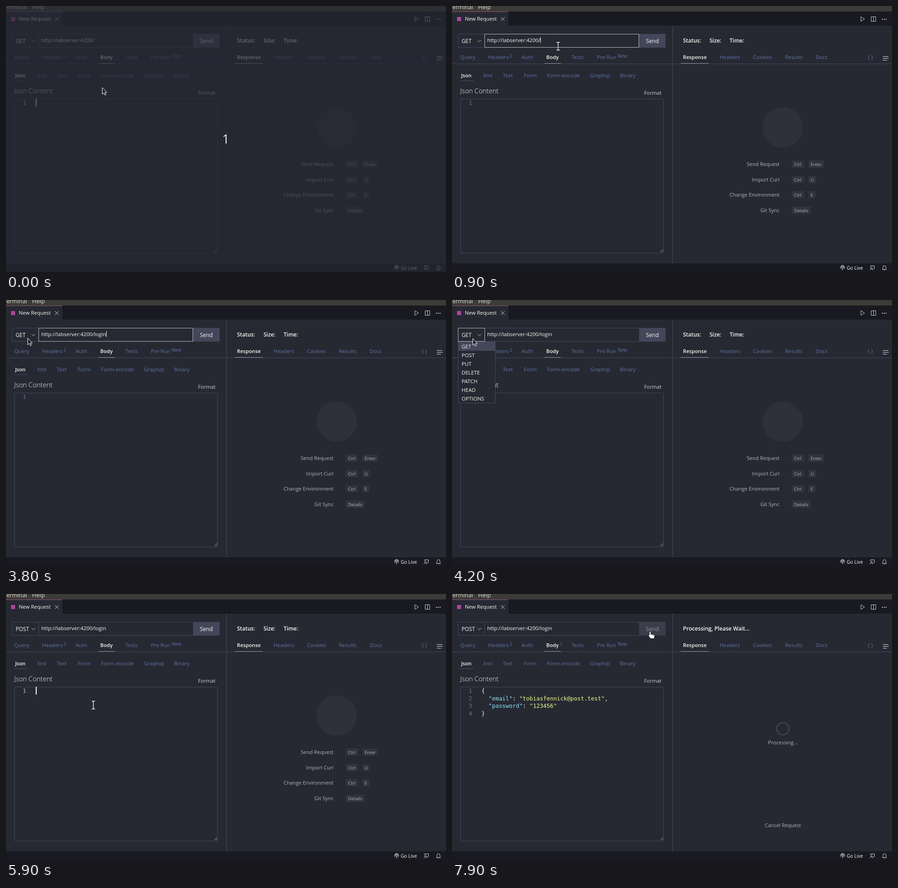
Write an HTML page that moves like this. It is 962 px wide and 582 px high and loops after 8 s.

```html
<!DOCTYPE html>
<html lang="en">
<head>
<meta charset="utf-8">
<title>Request panel</title>
<style>
  html, body { margin: 0; width: 100%; height: 100%; overflow: hidden; background: #262932; }
  svg { display: block; width: 962px; height: 582px; font-family: "Open Sans", "Noto Sans", sans-serif; }
  text { white-space: pre; }
  .code { font-family: "DejaVu Sans Mono", monospace; font-size: 12.4px; }
</style>
</head>
<body>
<svg id="stage" viewBox="0 0 962 582"></svg>
<script>
const BG = '#262932', DARK = '#191a21', LINE = '#44475a', BLUE = '#6272a4',
      WHITE = '#f8f8f2', GREY = '#b2b4b8', CYAN = '#8be9fd', YELLOW = '#f1fa8c';
const LOOP = 8000;
const HOST = 'http://labserver:4200/', PATH = 'login';

const text = (x, y, s, size = 11.5, fill = BLUE, attrs = '') =>
  `<text x="${x}" y="${y}" font-size="${size}" fill="${fill}" ${attrs}>${s}</text>`;
const bold = (x, y, s, size = 11.2) => text(x, y, s, size, WHITE, 'font-weight="600"');
const box = (x, y, w, h, fill, attrs = '') =>
  `<rect x="${x}" y="${y}" width="${w}" height="${h}" fill="${fill}" ${attrs}/>`;
const frame = (x, y, w, h, color, attrs = '') =>
  box(x + .5, y + .5, w, h, 'none', `stroke="${color}" ${attrs}`);
const line = (d, color, attrs = '') => `<path d="${d}" fill="none" stroke="${color}" ${attrs}/>`;
const group = (id, ...parts) => `<g id="${id}">${parts.join('')}</g>`;
const row = (y, items) => items.map(([x, s]) => text(x, y, s)).join('');
const code = (x, y, s, fill = WHITE, attrs = '') =>
  `<text class="code" x="${x}" y="${y}" fill="${fill}" ${attrs}>${s}</text>`;
const lineY = n => Math.round(199 + 16.8 * n);
const lineNo = n => code(44, lineY(n), n, BLUE, `id="no${n}" text-anchor="end"`);

function topBars() {
  return box(0, 0, 962, 12, '#3c3b37') +
    text(46, 7, 'Terminal', 12.6, '#dfdbd2', 'text-anchor="end"') + text(57, 7, 'Help', 12.9, '#dfdbd2') +
    box(0, 12, 962, 31, DARK) + box(0, 12, 123, 31, BG) + box(0, 12, 123, 1, '#94527e') +
    box(11, 24, 9, 9, '#a8479b') + text(28, 32, 'New Request', 11.4, WHITE) +
    line('M107 24.5l8 8m0-8l-8 8', '#d8d8d6') +
    line('M894 23.5v10l8-5z', '#d0d0d0') +
    line('M916.5 23.5h10v10h-10zM921.5 23.5v10', '#d0d0d0') +
    [940, 944, 948].map(x => box(x, 28, 2, 2, '#d0d0d0')).join('');
}

function statusBar() {
  return box(0, 563, 962, 19, DARK) + text(863, 577, 'Go Live', 10.4, WHITE) +
    line('M851 575a4.2 4.2 0 1 1 6 0M852.6 573a2 2 0 1 1 2.8 0M854 572v6', '#d8d8d6', 'stroke-width="1.2"') +
    line('M915 571v-2.5h8.500v6h-2l-2 2M914 578c0-4 6-4 6 0M917 571.500a1.600 1.600 0 1 0 .1 0', '#d8d8d6') +
    line('M941 576.500h9l-1.200-2v-3a3.300 3.300 0 0 0-6.600 0v3zM944.500 578h2', '#d8d8d6');
}

function requestPane() {
  return frame(13, 61, 58, 29, LINE) + frame(71, 61, 338, 29, LINE) +
    group('urlFocus', frame(71, 61, 337, 29, '#b9bac0')) +
    group('methodFocus', frame(13, 61, 58, 29, '#b9bac0')) +
    text(21, 81, 'GET', 11.8, WHITE, 'id="method"') + line('M56 74.500l4 4 4-4', '#d0d0d0') +
    text(77, 79, HOST, 11.4, WHITE, 'id="url"') + box(0, 68, 1, 13, '#fff', 'id="urlCaret"') +
    box(409, 61, 58, 30, LINE, 'id="send"') + text(424, 81, 'Send', 12, WHITE, 'id="sendText"') +
    row(116, [[18, 'Query'], [79, 'Headers'], [152, 'Auth'], [261, 'Tests'], [317, 'Pre Run']]) +
    text(126, 113, '2', 9.5) + text(362, 113, 'New', 10) + bold(206, 116, 'Body') +
    group('bodyCount', text(236, 113, '1', 9.5)) +
    box(0, 126, 482, 1, LINE) + box(202, 125, 36, 1, '#8b8d96') +
    bold(20, 156, 'Json') + box(18, 163, 29, 1, '#4e515f') +
    row(156, [[68, 'Xml'], [111, 'Text'], [157, 'Form'], [208, 'Form-encode'], [302, 'Graphql'], [367, 'Binary']]) +
    text(18, 191, 'Json Content', 14.6, WHITE, 'font-weight="300"') + text(420, 194, 'Format', 11.3, '#d0d1d3') +
    frame(18, 203, 444, 337, LINE, 'rx="2"') + line('M455.500 538.500l6-6M459 538.500l2.500-2.500', '#a0a1a6');
}

function editor() {
  const pair = (n, key, value, end) => code(80, lineY(n),
    `<tspan fill="${CYAN}">"${key}"</tspan>: <tspan fill="${YELLOW}">"${value}"</tspan>${end}`);
  return lineNo(1) +
    group('json', lineNo(2), lineNo(3), lineNo(4), code(64.5, lineY(1), '{'),
      pair(2, 'email', 'tobiasfennick@post.test', ','), pair(3, 'password', '123456', ''), code(64.5, lineY(4), '}')) +
    group('brackets', frame(64, 203, 7, 16, '#b4b5b8'), frame(64, 253, 7, 16, '#b4b5b8')) +
    box(65, 203, 2, 17, '#fff', 'id="editCaret"');
}

function responsePane() {
  const key = (x, y, w, s) => box(x, y - 12, w, 16, '#31343f', 'rx="2"') + text(x + 5, y, s, 9.7, GREY);
  const hint = (y, label, ...keys) => text(716, y, label, 11.2, GREY, 'text-anchor="end"') +
    keys.map(([x, w, s]) => key(x, y, w, s)).join('');
  const ctrl = [743, 27, 'Ctrl'];
  const middle = 'text-anchor="middle"';
  return box(482, 43, 1, 520, LINE) +
    bold(505, 116, 'Response') + box(483, 126, 479, 1, LINE) + box(500, 125, 61, 1, '#8b8d96') +
    row(116, [[585, 'Headers'], [658, 'Cookies'], [728, 'Results'], [795, 'Docs'], [909, '{ }']]) +
    line('M942 110.500h12M942 114.500h13M942 118.500h9', '#e0e0de') +
    group('idle', bold(505, 80, 'Status:', 12), bold(563, 80, 'Size:', 12), bold(607, 80, 'Time:', 12),
      '<circle cx="723" cy="266" r="44" fill="#2e313a"/>',
      hint(350, 'Send Request', ctrl, [779, 34, 'Enter']), hint(384, 'Import Curl', ctrl, [779, 17, 'U']),
      hint(417, 'Change Environment', ctrl, [779, 16, 'E']), hint(451, 'Git Sync', [743, 41, 'Details'])) +
    group('busy', bold(505, 80, 'Processing, Please Wait...', 12.1),
      '<circle cx="723.5" cy="295" r="13.3" fill="none" stroke="#3d404c" stroke-width="3"/>',
      text(723.5, 329, 'Processing...', 11.2, GREY, middle), text(723.5, 510, 'Cancel Request', 11.05, GREY, middle));
}

function popup() {
  const methods = ['GET', 'POST', 'PUT', 'DELETE', 'PATCH', 'HEAD', 'OPTIONS'];
  return group('popup', box(13.5, 91.5, 81, 134, BG, `stroke="${LINE}"`),
    box(14, 92, 80, 19, LINE, 'id="pick"'),
    methods.map((m, i) => text(21, 106 + 19 * i, m, 11.5, WHITE)).join(''));
}

function cursors() {
  return group('arrow', '<path d="M.5.5V15l3.400-3.200 2.400 5.200 2.300-1-2.400-5h4.300z" fill="#1d1e22" stroke="#fff"/>') +
    group('ibeam', line('M-3.500-8.500h2.500l1 1 1-1h2.500M0-7.500v15M-3.500 8.500h2.500l1-1 1 1h2.500', '#fff', 'stroke-width="1.300"')) +
    group('hand', `<path d="M-1.500 1q1.500-2 3 0v5l7 1.500q1.500.5 1.500 2l-1 6h-8l-4.500-6.500q0-2 2-1z"
      fill="#fff" stroke="#1d1e22" stroke-width=".8"/>`);
}

const svg = document.getElementById('stage');
svg.innerHTML = box(0, 0, 962, 582, BG) + topBars() + requestPane() + editor() + responsePane() + statusBar() +
  group('veil', box(0, 0, 962, 582, BG, 'opacity=".7"'), text(480.5, 301, '1', 27, '#ececec', 'text-anchor="middle"')) +
  popup() + cursors();

const el = {};
svg.querySelectorAll('[id]').forEach(n => el[n.id] = n);
const show = (id, on) => el[id].style.display = on ? '' : 'none';
const paint = (id, color) => el[id].setAttribute('fill', color);

// Pointer moves: first step, last step, end point, shape
const moves = [
  [0, 0, 210, 178, 'arrow'], [100, 100, 211, 178, 'hand'], [200, 400, 224, 136, 'arrow'],
  [600, 600, 228, 110, 'arrow'], [700, 700, 232, 88, 'ibeam'], [1300, 1400, 202, 54, 'arrow'],
  [3200, 3300, 199, 49, 'arrow'], [3500, 3700, 37, 104, 'arrow'], [3800, 3800, 47, 83, 'arrow'],
  [4000, 4000, 46, 75, 'arrow'], [4200, 4500, 43, 109, 'arrow'], [4800, 4900, 43, 183, 'arrow'],
  [5100, 5200, 58, 225, 'arrow'], [5300, 5300, 70, 243, 'ibeam'], [5500, 5600, 191, 243, 'ibeam'],
  [6300, 6300, 191, 264, 'ibeam'], [6600, 6700, 225, 322, 'ibeam'], [6800, 7100, 362, 153, 'arrow'],
  [7400, 7500, 405, 108, 'arrow'], [7600, 7700, 433, 82, 'hand']
];
const typedAt = [1900, 2100, 2200, 2400, 2500];

function pointer(t) {
  const i = moves.findLastIndex(m => m[0] <= t);
  const [start, end, x, y, shape] = moves[i];
  const [, , fromX, fromY] = moves[Math.max(0, i - 1)];
  const p = Math.min(1, (t - start + 100) / (end - start + 100));
  return { x: fromX + (x - fromX) * p, y: fromY + (y - fromY) * p, shape };
}

function render(ms) {
  const t = Math.floor(ms % LOOP / 100) * 100;
  const during = (a, b) => t >= a && t < b;

  show('veil', t < 100);
  show('urlFocus', during(900, 4200));
  show('methodFocus', during(4200, 4900));
  el.method.textContent = t < 4800 ? 'GET' : 'POST';
  el.url.textContent = HOST + PATH.slice(0, typedAt.filter(k => k <= t).length);
  el.urlCaret.setAttribute('x', Math.round(77 + el.url.getComputedTextLength()));
  show('urlCaret', during(900, 3300) || during(3800, 4200));
  show('popup', during(4000, 4700));
  el.pick.setAttribute('y', t < 4400 ? 92 : 111);

  const pasted = t >= 6100;
  show('json', pasted);
  show('brackets', during(6100, 7700));
  show('editCaret', t < 200 || during(700, 900) || during(5900, 6600) || during(7100, 7600));
  el.editCaret.setAttribute('x', pasted ? 72 : 65);
  el.editCaret.setAttribute('y', pasted ? 253 : 203);
  paint('no1', t < 900 || during(5900, 6100) ? '#b4b6bc' : BLUE);
  paint('no4', t < 7700 ? '#d4d5d8' : BLUE);

  const busy = t >= 7800;
  show('idle', !busy);
  show('busy', busy);
  show('bodyCount', busy);
  paint('send', busy ? '#3b3d4b' : LINE);
  paint('sendText', busy ? '#92949c' : WHITE);

  const { x, y, shape } = pointer(t);
  for (const id of ['arrow', 'ibeam', 'hand']) show(id, id === shape);
  el[shape].setAttribute('transform', `translate(${Math.round(x)} ${Math.round(y)})`);
}

const begin = performance.now();
function tick() {
  render(performance.now() - begin);
  requestAnimationFrame(tick);
}
tick();
</script>
</body>
</html>
```
